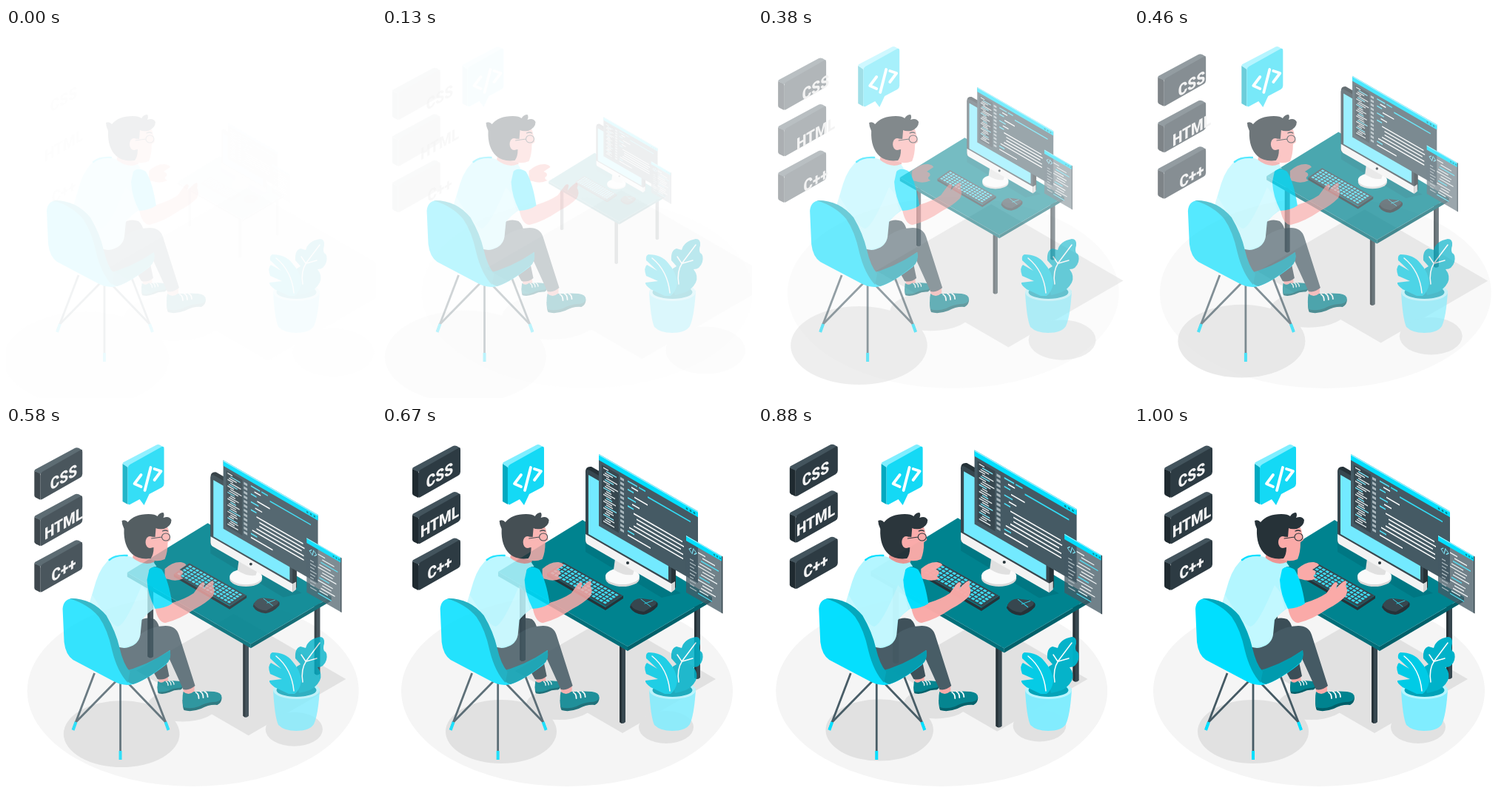
Recreate the animation shown at these times as an HTML page with a canvas. Size 500 by 500 pixels, loop 1040 ms.

```html
<!DOCTYPE html>
<html lang="en">
<head>
<meta charset="utf-8">
<title>Programmer at a desk</title>
<style>
html, body { margin: 0; width: 100%; height: 100%; overflow: hidden; background: #fff; }
canvas { display: block; width: 100vw; height: 100vh; }
</style>
</head>
<body>
<canvas id="stage"></canvas>
<script>
const SIZE = 500, LOOP = 1040, STEPS = 25;
const dpr = window.devicePixelRatio || 1;
const stage = document.getElementById('stage');
const layer = document.createElement('canvas');
stage.width = stage.height = layer.width = layer.height = Math.round(SIZE * dpr);
const out = stage.getContext('2d');
const c = layer.getContext('2d');

const CYAN = '#00dfff', TEAL = '#00838f', SLATE = '#455a64', DARK = '#37474f',
      INK = '#263238', SKIN = '#faaaa8', PALE = '#80edff', SHADE = '#e1e1e1';

// CSS-style cubic-bezier easing
function bezier(x1, y1, x2, y2) {
  const at = (a, b, u) => 3 * a * u * (1 - u) ** 2 + 3 * b * u * u * (1 - u) + u ** 3;
  return t => {
    if (t >= 1) return 1;
    let lo = 0, hi = 1;
    for (let i = 0; i < 30; i++) {
      const mid = (lo + hi) / 2;
      if (at(x1, x2, mid) < t) lo = mid; else hi = mid;
    }
    return at(y1, y2, lo);
  };
}
const easeOut = bezier(0, 0, 0.58, 1);
const spring = bezier(0.36, -0.01, 0.5, 1.38);

function fill(color, d) {
  c.fillStyle = color;
  c.fill(new Path2D(d));
}
function line(color, width, d) {
  c.strokeStyle = color;
  c.lineWidth = width;
  c.stroke(new Path2D(d));
}
function oval(color, x, y, rx, ry = rx) {
  c.fillStyle = color;
  c.beginPath();
  c.ellipse(x, y, rx, ry, 0, 0, Math.PI * 2);
  c.fill();
}
function rect(color, x, y, w, h) {
  c.fillStyle = color;
  c.fillRect(x, y, w, h);
}
function within(matrix, draw) {
  c.save();
  c.transform(...matrix);
  draw();
  c.restore();
}

// Draws a part flat, then blends it as one piece
function part(alpha, draw, { dx = 0, dy = 0, scale = 1, ox = 0, oy = 0 } = {}) {
  c.setTransform(1, 0, 0, 1, 0, 0);
  c.clearRect(0, 0, layer.width, layer.height);
  c.setTransform(dpr * scale, 0, 0, dpr * scale,
    dpr * (ox * (1 - scale) + dx), dpr * (oy * (1 - scale) + dy));
  c.lineCap = c.lineJoin = 'round';
  draw();
  out.globalAlpha = Math.max(0, Math.min(1, alpha));
  out.drawImage(layer, 0, 0);
}

function floor() {
  oval('#f5f5f5', 250, 358, 224, 129);
}

function shadows() {
  fill(SHADE, 'M306 258 L451 342 L325 415 L180 331Z');
  oval(SHADE, 240, 376, 45, 21);
  oval(SHADE, 161, 413, 75, 43);
  oval(SHADE, 384, 407, 37, 22);
}

function leg(x, top, bottom) {
  fill(DARK, `M${x - 4} ${top} H${x + 4} V${bottom - 2} Q${x} ${bottom + 2} ${x - 4} ${bottom - 2}Z`);
  fill(INK, `M${x - 4} ${top} H${x - 1} V${bottom} L${x - 4} ${bottom - 2}Z`);
}

function keyboard() {
  fill(INK, 'M223 199 L302 245 L326 229 V233 L302 249 L223 203Z');
  within([80, 45, -22, 15, 245, 184], () => {
    rect(DARK, 0, 0, 1, 1);
    for (let row = 0; row < 5; row++)
      for (let col = 0; col < 15; col++)
        rect('#3fdcf2', 0.03 + col * 0.063, 0.08 + row * 0.175, 0.045, 0.12);
  });
}

function monitor() {
  oval('#d8d8d8', 325, 206, 23, 11);
  oval('#fafafa', 325, 203, 23, 11);
  fill('#e0e0e0', 'M316 172 L343 188 L339 201 Q327 203 313 194Z');
  fill(INK, 'M275 62 Q275 54 283 55 L391 117 Q397 121 397 128 V218 L391 224 L275 157Z');
  fill(DARK, 'M275 64 Q275 57 281 60 L387 121 Q391 124 391 130 V213 L275 146Z');
  fill('#73eaff', 'M279 66 L387 128 V208 L279 146Z');
  fill('#f3f3f3', 'M275 146 L391 213 V225 L278 160 Q275 158 275 154Z');
  fill('#d5d5d5', 'M391 213 L396 210 V221 L391 225Z');
  oval(INK, 332, 185, 2);
}

function codeWindow() {
  within([1, 0.577, 0, 1, 293, 38], () => {
    rect(SLATE, 0, 0, 134, 97);
    rect(CYAN, 0, 0, 134, 8);
    rect('#9df3ff', 0, 0, 134, 1.5);
    for (let i = 0; i < 3; i++) oval(TEAL, 119 + i * 5, 5, 1.4);
    // side panel
    rect(DARK, 4, 12, 23, 79);
    for (let i = 0; i < 25; i++) {
      const indent = 6 + (i * 5 % 3) * 2;
      rect(i % 4 === 1 ? PALE : '#e6ecee', indent, 14 + i * 3, 7 + i * 7 % 10, 1.5);
    }
    for (let i = 0; i < 12; i++) rect('#a9b7bd', 29, 14 + i * 6.3, 5, 3.4);
    // indent, length, tint
    [[0, 13, 1], [5, 9, 0], [0, 8, 1], [9, 18, 0], [0, 11, 1], [6, 10, 0], [0, 8, 1],
     [8, 66, 0], [12, 64, 0], [12, 60, 0], [8, 67, 0], [2, 73, 0], [0, 9, 1], [0, 31, 0]]
      .forEach(([x, w, tint], i) => rect(tint ? '#4fe3fa' : '#fff', 39 + x, 13 + i * 5.6, w, 1.8));
    rect('#33dcf5', 66, 19, 58, 1.8);
    rect('#33dcf5', 54, 13, 9, 1.8);
  });
}

function smallWindow() {
  within([1, 0.577, 0, 1, 411, 148], () => {
    c.globalAlpha = 0.76;
    rect(SLATE, 0, 0, 49, 77);
    c.globalAlpha = 1;
    rect(CYAN, 0, 0, 49, 7);
    rect('#9df3ff', 0, 0, 49, 1.2);
    for (let i = 0; i < 3; i++) oval(TEAL, 38 + i * 4, 4.2, 1.1);
    line(PALE, 1, 'M7 13 L4 16 L7 19 M10 12 L8 20 M11 13 L14 16 L11 19');
    for (let i = 0; i < 13; i++) {
      const x = 16 + (i * 3 % 4) * 2;
      rect(i % 5 === 2 ? '#52e4fa' : '#f4f8f9', x, 13 + i * 4.6, 10 + i * 7 % 15, 1.4);
    }
    for (let i = 0; i < 9; i++) rect('#b4c1c6', 5, 28 + i * 4.8, 5 + i * 3 % 5, 1.3);
    rect(DARK, 48, 0, 1.5, 77);
  });
}

function desk() {
  leg(190, 215, 318);
  leg(426, 236, 342);
  leg(325, 296, 402);
  fill('#006e79', 'M157 197 L332 298 V304 L157 203Z');
  fill('#00616b', 'M446 231 L332 298 V304 L446 237Z');
  fill(TEAL, 'M271 127 L446 231 L332 298 L157 197Z');
  fill('#007783', 'M275 158 L300 165 L404 226 L378 232 L275 170Z');
  monitor();
  keyboard();
  fill(INK, 'M335 245 Q337 235 349 234 L367 236 Q375 238 372 244 Q364 253 353 255 Q340 254 335 245Z');
  fill(DARK, 'M336 242 Q340 233 350 233 L366 235 Q374 238 369 242 L354 251 Q341 250 336 242Z');
  line('#2fcfe4', 1, 'M350 234 L363 244 M355 240 L366 236');
  codeWindow();
  smallWindow();
}

function chairLegs() {
  const legs = [[126, 334, 97, 410], [155, 345, 100, 401], [161, 347, 161, 449],
                [198, 338, 226, 410], [170, 346, 222, 400]];
  c.lineCap = 'butt';
  for (const [x1, y1, x2, y2] of legs) line(SLATE, 2.8, `M${x1} ${y1} L${x2} ${y2}`);
  line(CYAN, 4, 'M101 400 L97 411 M161 439 V451 M222 400 L226 411');
  c.lineCap = 'round';
}

function shoe(x, y, k) {
  within([k, 0, 0, k, x, y], () => {
    fill('#005f69', 'M0 12 Q0 23 2 26 Q12 29 25 24 Q36 18 47 19 Q53 16 53 9 L40 10Z');
    fill(TEAL, 'M1 1 Q8 7 15 1 L24 1 Q32 0 43 1 Q53 2 53 9 Q51 15 41 15 Q31 16 22 21 Q11 25 1 22 Q-1 10 1 1Z');
    line('#fff', 1.8, 'M18 2 Q22 4 22 10 M24 1 Q28 3 28 9 M30 1 Q34 3 34 8');
  });
}

function head() {
  fill('#ee9694', 'M180 165 L206 172 L207 184 Q194 191 177 181Z');
  fill(SKIN, 'M195 140 L212 133 Q224 132 226 140 L229 154 L225 157 Q225 171 221 180 Q212 184 202 181 L190 178Z');
  fill(INK, 'M166 139 Q163 133 163 128 Q168 126 171 130 Q180 119 199 119 Q208 119 211 122 ' +
    'Q214 117 219 117 Q221 120 219 124 Q227 121 230 127 Q230 135 220 139 Q212 140 209 138 ' +
    'L208 150 Q197 148 196 157 Q198 166 206 164 Q206 174 202 179 Q186 181 177 173 Q165 162 166 139Z');
  oval(SKIN, 201, 157, 6, 8);
  line(INK, 1.1, 'M203 152 L217 150 M217 150 A5.5 5 0 1 1 228 150 A5.5 5 0 1 1 217 150');
  line(INK, 1.3, 'M218 142 Q222 140 225 142');
}

function coder() {
  fill(SKIN, 'M221 193 Q232 183 243 184 Q249 185 250 188 L241 194 Q247 196 245 200 Q240 203 246 206 Q236 211 226 207 L221 206Z');
  fill(SKIN, 'M212 338 L225 336 L226 348 Q218 353 213 348Z');
  shoe(211, 344, 0.66);
  fill('#3b4e57', 'M186 263 Q197 257 207 261 Q213 266 214 275 L227 338 Q220 344 211 342 L200 322 L184 296Z');
  chairLegs();
  fill(SKIN, 'M245 352 L261 349 L261 361 Q252 369 247 362Z');
  shoe(245, 358, 1);
  fill(SLATE, 'M155 301 Q178 291 190 280 Q205 270 222 270 Q236 270 240 282 L262 351 Q254 358 246 356 L226 312 Q215 322 190 328 Q172 333 160 330Z');

  head();
  fill('#b3f6ff', 'M150 177 Q135 188 128 210 L119 240 L140 262 L152 295 Q162 302 172 299 Q186 295 188 282 ' +
    'L190 262 Q198 252 208 246 L200 195 Q203 190 210 190 L206 184 Q192 190 176 177 Q164 173 150 177Z');
  fill('rgba(255,255,255,.2)', 'M123 228 Q150 272 158 271 Q168 268 190 215 L198 225 L204 247 L189 262 L188 282 Q185 297 160 299 L140 262 L119 240Z');
  line(CYAN, 2.5, 'M146 181 Q154 174 170 175');
  fill(SKIN, 'M208 246 Q222 246 231 239 Q248 234 260 226 L268 215 Q273 208 275 213 L273 220 Q281 210 286 209 ' +
    'Q288 213 286 216 Q290 222 286 230 Q276 240 262 247 Q240 262 222 266 Q212 266 208 246Z');
  fill(CYAN, 'M200 194 Q206 187 217 194 Q226 208 231 240 Q222 246 208 247 Q198 228 197 208Z');

  fill(CYAN, 'M83 247 Q84 234 96 233 Q122 237 138 257 Q150 278 155 300 Q160 322 168 332 Q200 324 228 303 ' +
    'Q230 315 222 323 Q195 344 178 349 Q165 352 152 345 L97 316 Q87 309 85 292Z');
  fill('#009bae', 'M163 332 Q195 325 228 303 Q231 316 222 322 Q195 344 178 349 Q167 346 163 332Z');
  fill('#00a6bb', 'M92 233 Q122 232 142 256 Q155 278 160 300 Q165 322 174 332 L171 347 Q157 332 150 304 Q144 275 132 258 Q118 241 92 233Z');
}

function plant() {
  fill(PALE, 'M361 357 Q363 393 368 404 Q376 412 392 412 Q410 412 416 403 Q422 390 424 355Z');
  oval('#b8f6ff', 392.5, 357, 31.5, 12);
  oval('#00a2b8', 392.5, 357, 27, 9);
  fill('#00b2c9', 'M396 361 Q389 340 393 325 L398 322 L391 314 Q390 300 398 298 L405 300 Q408 288 424 285 ' +
    'Q431 285 430 294 Q428 300 430 304 Q435 306 433 316 Q430 326 421 326 Q428 335 424 344 Q418 356 404 359Z');
  fill('#00cbe6', 'M382 362 L363 353 Q355 347 356 344 L373 342 L357 335 Q353 324 358 320 L372 328 L357 314 ' +
    'Q356 307 360 306 Q378 306 387 318 Q398 330 399 345 Q397 357 390 362Z');
  line('#fff', 1.5, 'M365 311 Q386 328 389 358 M424 293 L406 317 Q398 329 401 346 M405 318 L399 309 M406 318 L420 314');
}

function bubble() {
  fill('#00a9c0', 'M163 51 L170 55 V106 L163 102Z');
  fill('#7feeff', 'M163 51 Q163 49 166 48 L208 26 Q211 24 214 26 L219 29 L170 56Z');
  fill('#14d9f5', 'M170 57 Q170 54 173 52 L216 28 Q219 27 219 31 V78 Q219 81 216 83 L199 92 L192 107 L186 99 L173 106 Q170 107 170 103Z');
  line('#fff', 3.8, 'M188 66 L179 78 L188 82 M201 56 L193 87 M206 58 L215 61 L206 73');
}

const labels = ['CSS', 'HTML', 'C++'];

function labelBoxes() {
  labels.forEach((_, i) => within([1, 0, 0, 1, 0, i * 62.5], () => {
    fill('#1f2a30', 'M41 58 L49 61 V97 L43 94 Q41 93 41 91Z');
    fill('#43545d', 'M41 58 Q41 56 44 55 L96 27 Q98 26 101 27 L106 30 L49 62Z');
    fill('#2d3b43', 'M49 64 Q49 61 52 59 L103 30 Q106 28 106 32 V62 Q106 65 103 67 L52 96 Q49 98 49 95Z');
  }));
}

function labelText() {
  c.font = '900 22px Roboto, Inter, sans-serif';
  c.textAlign = 'center';
  c.fillStyle = '#f3f3f3';
  labels.forEach((word, i) =>
    within([0.866, -0.5, 0, 1, 78, 66 + i * 62.5], () => c.fillText(word, 0, 8)));
}

function render(t) {
  const p = spring(t), q = easeOut(t);
  const late = Math.max(0, p) ** 1.6;
  const rest = 30 * (1 - p);
  out.globalAlpha = 1;
  out.fillStyle = '#fff';
  out.fillRect(0, 0, stage.width, stage.height);
  part(late, floor, { dx: rest });
  part(p, shadows, { scale: 1.5 - 0.5 * p, ox: 267, oy: 344 });
  part(p, desk, { scale: 0.5 + 0.5 * p, ox: 307, oy: 219 });
  part(q, plant);
  part(q, coder, { dx: -30 * (1 - q) });
  part(late, bubble, { dx: -2 * rest });
  part(late, labelBoxes, { dx: -rest, dy: rest });
  part(2 * q, labelText, { dy: rest });
}

let shown = -1, start = null;
function tick(now) {
  if (start === null) start = now;
  const ms = (now - start) % LOOP;
  const step = Math.min(STEPS - 1, Math.floor((ms + 5) * STEPS / LOOP));
  if (step !== shown) render((step + 1) / STEPS);
  shown = step;
  requestAnimationFrame(tick);
}
render(1 / STEPS);
requestAnimationFrame(tick);
</script>
</body>
</html>
```
